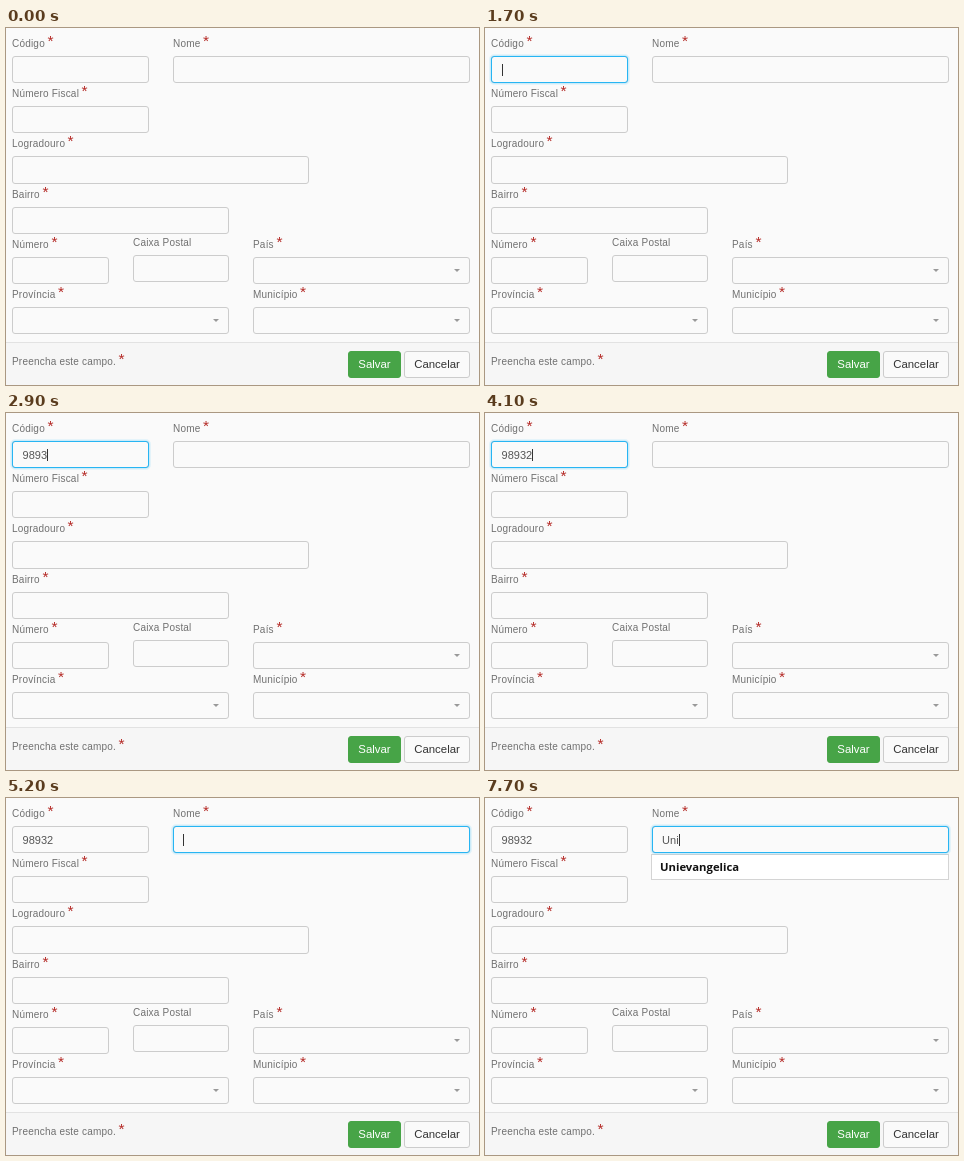
These frames come from a looping animation (473 by 357 pixels, 8 s). An HTML page:

```html
<!DOCTYPE html>
<html lang="pt">
<head>
<meta charset="utf-8">
<title>Cadastro</title>
<style>
  html, body { margin: 0; width: 100%; height: 100%; overflow: hidden; background: #fafafa; }
  svg { display: block; width: 473px; height: 357px; font-family: "Liberation Sans", Arial, sans-serif; }
  text { white-space: pre; }
  .label { font-size: 10px; letter-spacing: .2px; fill: #707070; }
  .star { font-size: 15.5px; fill: #b52b27; }
  .field { fill: #fafafa; stroke: #ccc; }
  .arrow { fill: #999; }
  .value { font-size: 11px; fill: #555; }
  .focus rect { fill: none; stroke: #27b5f3; }
  .caret { fill: #333; }
  .list rect { fill: #fff; stroke: #d4d4d4; }
  .list text { font-family: "Open Sans", "Noto Sans", sans-serif; font-weight: 700; fill: #111; }
  .button { font-size: 11.4px; text-anchor: middle; }
</style>
</head>
<body>
<svg id="stage" viewBox="0 0 473 357"></svg>
<script>
const LOOP = 8000;
const stage = document.getElementById("stage");

function add(tag, attrs, parent = stage, content = "") {
  const el = document.createElementNS("http://www.w3.org/2000/svg", tag);
  for (const key in attrs) el.setAttribute(key, attrs[key]);
  el.textContent = content;
  parent.append(el);
  return el;
}

function box(x, y, width, height, attrs, parent) {
  return add("rect", { x: x + .5, y: y + .5, width: width - 1, height: height - 1, rx: 2.5, ...attrs }, parent);
}

function label(x, y, content, starX) {
  add("text", { x, y, class: "label" }, stage, content);
  if (starX) add("text", { x: starX, y: y - 1, class: "star" }, stage, "*");
}

function field(x, y, width, content, { star, isSelect, height = 27 }) {
  label(x, y - 9, content, star);
  box(x, y, width, height, { class: "field" });
  if (isSelect) add("path", { d: `M${x + width - 16} ${y + 12}h6l-3 3z`, class: "arrow" });
}

add("rect", { y: 314, width: 473, height: 43, fill: "#f6f6f6" });
add("rect", { y: 314, width: 473, height: 1, fill: "#e2e2e2" });

field(6, 28, 137, "Código", { star: 41.5 });
field(167, 28, 297, "Nome", { star: 197 });
field(6, 78, 137, "Número Fiscal", { star: 75.5 });
field(6, 128, 297, "Logradouro", { star: 61.5, height: 28 });
field(6, 179, 217, "Bairro", { star: 36.5 });
field(6, 229, 97, "Número", { star: 45.5 });
field(127, 227, 96, "Caixa Postal", {});
field(247, 229, 217, "País", { star: 270.5, isSelect: true });
field(6, 279, 217, "Província", { star: 52, isSelect: true });
field(247, 279, 217, "Município", { star: 294, isSelect: true });
label(6, 337, "Preencha este campo.", 112.5);

box(342, 323, 53, 27, { fill: "#47a447", stroke: "#47a447" });
add("text", { x: 368.5, y: 340, class: "button", fill: "#fff" }, stage, "Salvar");
box(398, 323, 66, 27, { fill: "#fafafa", stroke: "#ccc" });
add("text", { x: 431, y: 340, class: "button", fill: "#333" }, stage, "Cancelar");

function liveInput(x, width, listX) {
  const list = add("g", { class: "list" });
  const frame = box(listX, 56, x + width - listX, 26, { rx: 0 }, list);
  const rows = [73, 97].map(y => add("text", { x: x + 8, y }, list));
  const focus = add("g", { class: "focus" });
  // Border, then a soft halo growing outwards.
  [1, .22, .1].forEach((opacity, grow) =>
    box(x - grow, 28 - grow, width + 2 * grow, 27 + 2 * grow,
      { rx: 2.5 + grow, "stroke-opacity": opacity }, focus));
  const textX = x + (x < 100 ? 10.6 : 10.1);
  const value = add("text", { x: textX, y: 46, class: "value" });
  const caret = add("rect", { y: 36, width: 1, height: 12, class: "caret" });

  return ({ text, glow, blink, items, size }) => {
    value.textContent = text;
    focus.setAttribute("opacity", glow);
    const end = text ? value.getComputedTextLength() : 0;
    caret.setAttribute("x", Math.round(textX + end));
    caret.setAttribute("opacity", blink);
    list.setAttribute("opacity", items.length ? 1 : 0);
    list.setAttribute("font-size", size);
    frame.setAttribute("height", items.length > 1 ? 49 : 25);
    rows.forEach((row, i) => row.textContent = items[i] || "");
  };
}

const drawCode = liveInput(6, 137, 6);
const drawName = liveInput(167, 297, 166);

// Latest value of a [time, value, time, value, ...] track.
function at(track, t) {
  let value = track[1];
  for (let i = 0; i < track.length; i += 2) if (t >= track[i]) value = track[i + 1];
  return value;
}

const code = {
  text: [0, "", 2000, "9", 2100, "98", 2400, "989", 2900, "9893", 3100, "98932"],
  glow: [0, 0, 700, .5, 800, 1, 5000, .7, 5100, .25, 5200, 0],
  blink: [0, 0, 700, 1, 1200, 0, 1700, 1, 3600, 0, 4100, 1, 4600, 0],
  items: [0, [], 2000, ["98", "99"], 2100, ["98"], 2400, []],
  size: [0, 12]
};
const name = {
  text: [0, "", 6300, "U", 7500, "Un", 7700, "Uni"],
  glow: [0, 0, 5000, .3, 5100, .75, 5200, 1],
  blink: [0, 0, 5100, 1, 5600, 0, 6100, 1, 6800, 0, 7300, 1],
  items: [0, [], 6300, ["Unievangelica"]],
  size: [0, 11.3]
};

const sample = (tracks, t) =>
  Object.fromEntries(Object.entries(tracks).map(([key, track]) => [key, at(track, t)]));

const start = performance.now();
function render(now) {
  const t = Math.max(0, now - start) % LOOP;
  drawCode(sample(code, t));
  drawName(sample(name, t));
  requestAnimationFrame(render);
}
render(start);
</script>
</body>
</html>
```
